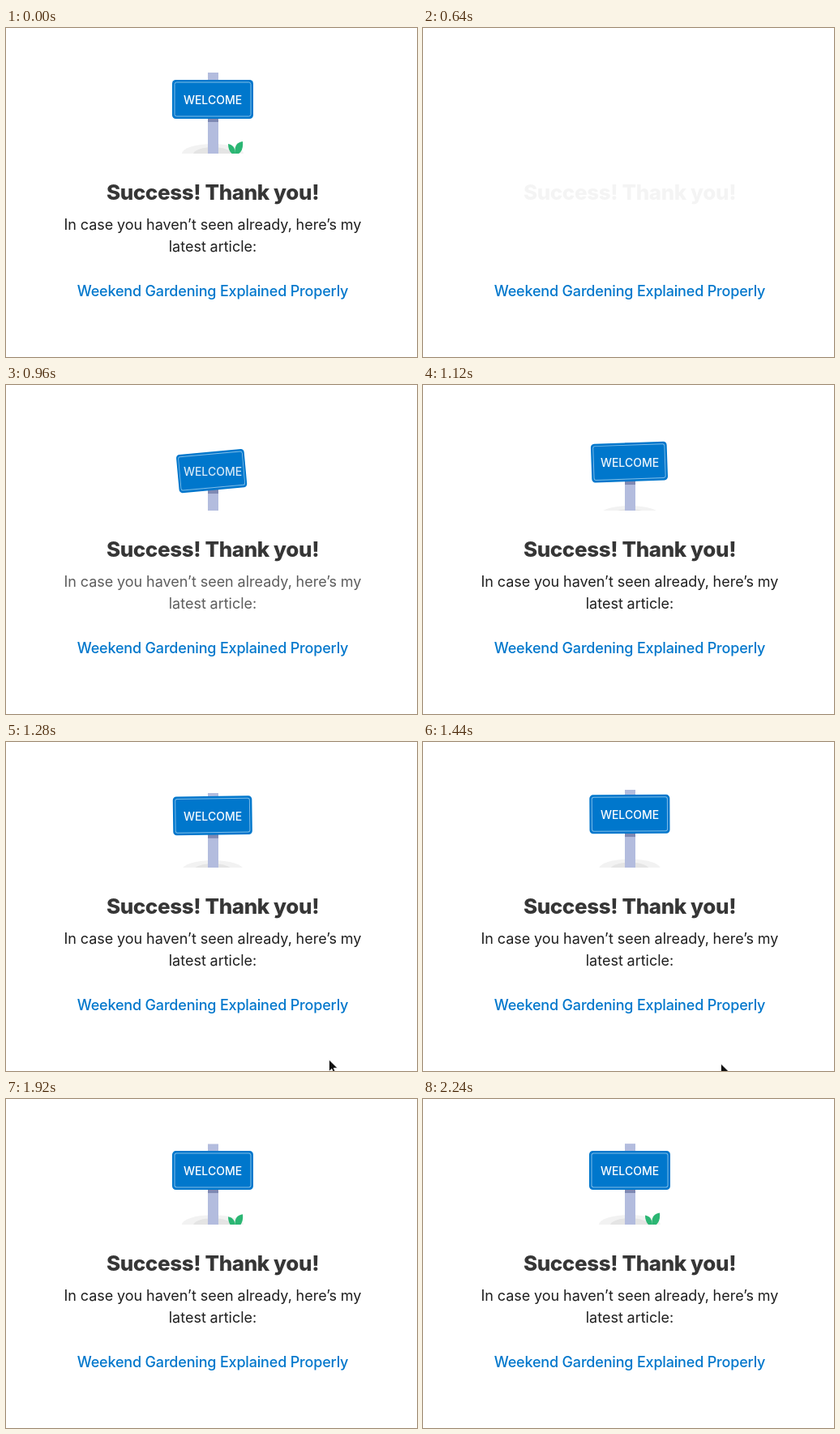
Recreate the animation shown at these times as an HTML page. Size 507 px wide and 406 px high, loop 2400 ms.

```html
<!DOCTYPE html>
<html lang="en">
<head>
<meta charset="utf-8">
<title>Success</title>
<style>
  html, body { margin: 0; width: 100%; height: 100%; overflow: hidden; background: #fff; }
  svg { display: block; width: 507px; height: 406px; }
  text { font-family: Inter, sans-serif; text-anchor: middle; }
  #title { font-size: 26px; font-weight: 800; letter-spacing: -.015em; fill: #363636; }
  #intro { font-size: 18px; word-spacing: -.3px; fill: #1f1f1f; }
  #link { font-size: 18px; font-weight: 500; letter-spacing: -.01em; fill: #0077cc; }
  #label { font-size: 14px; font-weight: 500; fill: #fff; }
</style>
</head>
<body>
<svg viewBox="0 0 507 406">
  <clipPath id="scene"><rect x="205" y="40" width="100" height="115"/></clipPath>
  <g clip-path="url(#scene)">
    <g id="ground">
      <ellipse cx="255" cy="155" rx="38" ry="12" fill="#f2f2f2"/>
      <ellipse cx="255" cy="156" rx="24" ry="9" fill="#e4e4e4"/>
    </g>
    <rect id="post" x="249" y="55" width="13" height="140" fill="#b3bcde"/>
    <rect id="shade" x="249" y="100" width="13" height="16" fill="#7f89b3"/>
    <g id="sign">
      <rect x="-50" y="-24" width="100" height="48" rx="4.5" fill="#0077cc"/>
      <rect x="-47" y="-21" width="94" height="42" rx="2.5" fill="none" stroke="#7fbce8"/>
    </g>
    <text id="label" x="255" y="94">WELCOME</text>
    <g id="leaf" fill="#2bb673">
      <path d="M274 143C280 144 283 148 283 157C277 156 274 150 274 143Z"/>
      <path d="M283 157C281 147 284 141 292 140C293 149 290 155 283 157Z"/>
    </g>
  </g>
  <text id="title" x="255" y="212">Success! Thank you!</text>
  <g id="intro">
    <text x="255" y="249">In case you haven’t seen already, here’s my</text>
    <text x="255" y="276">latest article:</text>
  </g>
  <text id="link" x="255" y="331">Weekend Gardening Explained Properly</text>
  <path id="cursor" d="M0 0V14.5L3.4 11.4L5.8 17L8.2 16L5.8 10.4H10.5Z" fill="#111" stroke="#fff" stroke-width=".8"/>
</svg>
<script>
  const LOOP = 2400, STEP = 160, START = 640;
  const el = id => document.getElementById(id);
  const clamp = v => Math.max(0, Math.min(1, v));
  const move = (id, x, y, rest = '') =>
    el(id).setAttribute('transform', `translate(${x} ${y}) ${rest}`);
  const fade = (id, v) => el(id).setAttribute('opacity', clamp(v));

  // Cursor tip at the two steps where it crosses the bottom edge
  const cursorAt = { 4: [398.5, 392], 5: [367.5, 397] };

  function draw(time) {
    const t = time % LOOP;
    const step = t < START ? Infinity : Math.floor((t - START) / STEP);
    const settle = (offset, ratio, from) => offset * ratio ** (step - from);

    const k = settle(1, 0.39, 1);
    const drop = 46.3 * k;
    move('sign', 255 - 3.5 * k, 88 + drop,
      `rotate(${-13.3 * k}) scale(${1 - 0.41 * k} ${1 - 0.03 * k})`);
    move('label', 0, drop);
    fade('label', 1 - 0.4 * k);
    move('shade', 0, drop);
    move('post', 0, settle(8, 0.5, 4));
    move('ground', 0, settle(3, 0.5, 4));
    move('leaf', 0, settle(9, 0.5, 6));

    fade('title', 0.05 + 0.54 * step);
    fade('intro', 0.3 + 0.42 * (step - 1));

    const tip = cursorAt[step];
    fade('cursor', tip ? 1 : 0);
    if (tip) move('cursor', ...tip);
  }

  const begin = performance.now();
  (function tick() {
    draw(performance.now() - begin);
    requestAnimationFrame(tick);
  })();
</script>
</body>
</html>
```
